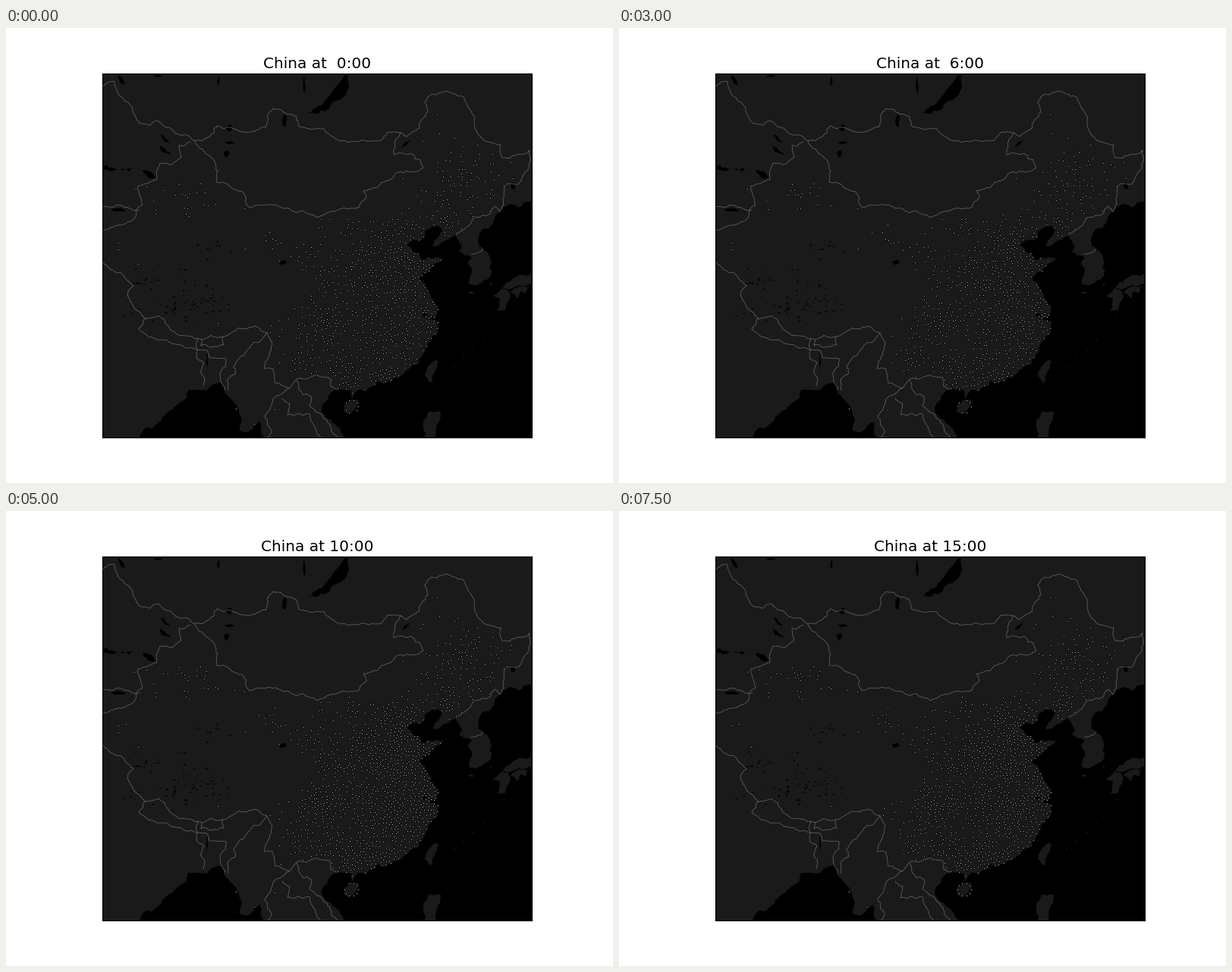
A matplotlib script that plays this animation: 800 by 600 pixels, repeating every 8 s.

```python
import numpy as np
import matplotlib.pyplot as plt
from matplotlib.animation import FuncAnimation
from matplotlib.path import Path

plt.rcParams["font.family"] = "DejaVu Sans"
rng = np.random.default_rng(8)
LAND, SEA = "#1a1a1a", "black"
LEFT, TOP, RIGHT, BOTTOM = 127, 60, 693, 540

fig = plt.figure(figsize=(8, 6), dpi=100, facecolor="white")
ax = fig.add_axes([LEFT / 800, 0.1, (RIGHT - LEFT) / 800, 0.8], facecolor=LAND)
ax.set(xlim=(LEFT, RIGHT), ylim=(BOTTOM, TOP), xticks=[], yticks=[])


def rough(*flat, amp=0.09, levels=4):
    """Turn x, y values into a naturally jagged line."""
    p = np.array(flat, float).reshape(-1, 2)
    for _ in range(levels):
        d = np.diff(p, axis=0)
        shift = rng.normal(0, amp, (len(d), 1)) * d[:, ::-1] * [1, -1]
        out = np.empty((2 * len(p) - 1, 2))
        out[::2] = p
        out[1::2] = p[:-1] + d / 2 + shift
        p = out
    return p


def area(points, color):
    ax.fill(*points.T, color=color, lw=0, zorder=1)


def island(*flat):
    area(rough(*flat, *flat[:2]), LAND)


def blob(x, y, w, h, color=SEA):
    a = np.linspace(0, 2 * np.pi, 13)
    r = rng.uniform(0.6, 1.25, 13)
    area(np.column_stack([x + w / 2 * r * np.cos(a), y + h / 2 * r * np.sin(a)]), color)


def border(*flat):
    points = rough(*flat)
    ax.plot(*points.T, color="0.45", lw=0.45, zorder=2)
    return points


# Coasts, from north to south
korea = rough(
    694, 229, 675, 237, 664, 232, 651, 242, 638, 263, 623, 274, 622, 281,
    637, 300, 640, 319, 637, 329, 611, 338, 614, 319, 609, 311, 614, 302,
    597, 295, 601, 287, 593, 273)
china = rough(
    593, 273, 574, 283, 563, 288, 575, 267, 570, 261, 561, 262, 547, 280,
    535, 279, 529, 286, 535, 294, 543, 297, 550, 307, 555, 302, 577, 304,
    562, 314, 547, 327, 545, 333, 552, 336, 559, 351, 570, 367, 568, 378,
    558, 383, 570, 387, 569, 402, 549, 432, 541, 444, 518, 461, 497, 469,
    489, 464, 488, 472, 463, 478, 457, 489, 455, 478, 438, 476)
tonkin = rough(438, 476, 426, 484, 416, 500, 425, 516, 441, 531, 447, 541)
area(np.vstack([korea, china, tonkin, [[694, 541]]]), SEA)
area(rough(175, 541, 196, 525, 206, 513, 238, 488, 240, 477, 285, 468,
           292, 485, 311, 516, 308, 531, 319, 533, 335, 519, 342, 541), SEA)

island(654, 342, 666, 332, 677, 325, 694, 322, 694, 336, 676, 339, 667, 343)
island(665, 349, 671, 343, 690, 340, 685, 350, 679, 347, 674, 356)
island(655, 343, 662, 346, 665, 354, 658, 372, 648, 373, 651, 357, 642, 354)
island(566, 437, 570, 440, 567, 450, 560, 471, 552, 459, 556, 447)
island(455, 490, 464, 490, 466, 495, 453, 509, 445, 505, 445, 498)
island(557, 505, 573, 506, 572, 517, 567, 527, 567, 541, 552, 541, 550, 529)
blob(613, 349, 8, 3, LAND)
blob(639, 338, 2, 5, LAND)
for t in np.linspace(0, 1, 6):  # thin island arc
    blob(656 - 66 * t, 381 + 65 * t ** 0.8, 2, 2, LAND)

# Lakes
area(rough(399, 112, 408, 113, 440, 95, 449, 84, 453, 60, 447, 60,
           430, 84, 420, 97, 399, 112), SEA)
area(rough(127, 183, 150, 186, 167, 185, 163, 189, 127, 187), SEA)
area(rough(180, 188, 190, 189, 197, 198, 188, 198, 180, 188), SEA)
area(rough(203, 155, 218, 167, 205, 164, 203, 155), SEA)
area(rough(204, 140, 216, 152, 208, 149, 204, 140), SEA)
area(rough(146, 60, 157, 75, 149, 68, 146, 60), SEA)
area(rough(522, 157, 525, 151, 533, 147, 522, 157), SEA)
blob(367, 122, 5, 16)
blob(294, 132, 9, 9)
blob(295, 151, 14, 4)
blob(291, 166, 7, 9)
blob(148, 240, 20, 5)
blob(668, 208, 6, 9)
blob(365, 309, 11, 7)
blob(552, 379, 7, 6)
blob(280, 70, 3, 15)
blob(393, 76, 3, 20)
blob(200, 63, 11, 4)
blob(265, 439, 2, 22)
for cx, cy, sx, sy, n in [(185, 332, 16, 7, 16), (225, 369, 28, 7, 34),
                          (262, 362, 18, 13, 26), (266, 306, 18, 16, 12)]:
    for x, y in rng.normal((cx, cy), (sx, sy), (n, 2)):
        blob(x, y, rng.uniform(1.5, 4.5), rng.uniform(1, 2.5))

# Borders
mongolia = border(
    249, 149, 273, 173, 279, 188, 277, 203, 305, 214, 325, 236, 365, 238,
    411, 250, 432, 242, 466, 236, 475, 224, 471, 215, 490, 210, 515, 191,
    550, 184, 536, 167, 511, 167, 520, 138)
amur = border(
    520, 138, 528, 143, 545, 132, 556, 111, 552, 97, 561, 87, 583, 84,
    603, 91, 617, 116, 622, 140, 652, 154, 654, 171, 664, 172, 690, 161,
    684, 190, 675, 206, 656, 209, 656, 233, 651, 242)
yalu = border(651, 242, 645, 235, 639, 243, 617, 250, 593, 273)
vietnam = border(438, 476, 428, 473, 427, 463, 410, 458, 383, 463, 373, 475)
burma = border(373, 475, 355, 468, 352, 450, 340, 449, 350, 413, 344, 402)
border(127, 78, 135, 71, 142, 70, 147, 85, 177, 126, 202, 123, 222, 137, 249, 149)
border(249, 149, 268, 143, 278, 129, 297, 131, 309, 137, 327, 137, 342, 131,
       345, 114, 352, 106, 381, 116, 385, 128, 419, 133, 445, 148, 495, 148,
       504, 137, 520, 138)
border(243, 150, 228, 155, 231, 169, 219, 180, 203, 178, 199, 200, 174, 208,
       180, 233, 155, 259, 127, 267)
border(127, 235, 152, 234, 176, 240)
border(127, 308, 137, 318, 155, 326, 168, 340, 160, 353, 168, 368, 184, 384,
       192, 382, 220, 400, 258, 411, 270, 405, 286, 407, 329, 393, 344, 402)
border(182, 383, 175, 397, 215, 414, 252, 424, 253, 409)
border(258, 411, 257, 419, 287, 418, 286, 407)
border(344, 402, 322, 420, 305, 438, 303, 455, 293, 462, 293, 478)
border(252, 424, 251, 435, 261, 442, 260, 472)
border(252, 424, 266, 426, 268, 435, 290, 436, 283, 453, 289, 477)
border(373, 475, 353, 488, 341, 512, 350, 531, 344, 541)
border(364, 488, 374, 495, 371, 510, 400, 509, 408, 527, 416, 541)
border(383, 464, 391, 483, 402, 486, 400, 498, 418, 514, 437, 541)
border(613, 298, 629, 291)

# Towns: centre x, y, spread x, y, tries
REMOTE = [(236, 216, 13, 5, 20), (238, 248, 4, 7, 6), (193, 225, 8, 18, 8),
          (350, 280, 14, 10, 18), (272, 235, 16, 2, 5), (146, 278, 6, 8, 3)]
CENTRES = [
    (520, 300, 22, 22, 420), (518, 277, 10, 9, 90), (552, 305, 14, 8, 90),
    (507, 335, 25, 14, 240), (553, 368, 13, 26, 420), (497, 385, 25, 30, 390),
    (536, 410, 18, 22, 250), (493, 457, 25, 8, 300), (460, 466, 15, 6, 80),
    (408, 383, 11, 9, 150), (430, 386, 15, 15, 85), (402, 425, 26, 22, 125),
    (387, 439, 4, 6, 28), (445, 445, 20, 16, 110), (458, 330, 25, 22, 150),
    (440, 338, 16, 2, 35), (472, 274, 28, 13, 85), (407, 313, 14, 13, 45),
    (583, 254, 9, 10, 75), (606, 200, 26, 27, 150), (548, 240, 22, 12, 20)]
LONE = [(549, 149), (595, 141), (568, 114), (301, 236), (174, 311), (279, 389),
        (327, 522), (354, 503), (303, 502), (665, 177)]


def scatter(groups):
    return np.vstack([rng.normal(g[:2], g[2:4], (g[4], 2)) for g in groups])


inland = Path(np.vstack([mongolia[len(mongolia) // 3:], amur, yalu, china,
                         vietnam, burma, [[345, 300]]]))
ring = np.linspace(0, 2 * np.pi, 11)[:-1]
hainan = np.column_stack([455 + 9 * np.cos(ring), 499 + 8 * np.sin(ring)])
tries = scatter(CENTRES)
rng.shuffle(tries)
tries = np.vstack([scatter(REMOTE), hainan, tries[inland.contains_points(tries)]])
towns = np.array(LONE, float)
for p in tries:
    if np.hypot(*(towns - p).T).min() > 3.5:
        towns = np.vstack([towns, p])

# Share of towns that are active in each hour
LEVEL = np.array([0.70, 0.56, 0.46, 0.41, 0.43, 0.50, 0.66, 0.78,
                  0.86, 0.90, 0.93, 0.93, 0.92, 0.93, 0.93, 0.91])
quiet = rng.uniform(0.3, 1.8, len(towns))
active = rng.random((len(LEVEL), len(towns))) < LEVEL[:, None] ** quiet

dots, = ax.plot([], [], "o", ms=1.6, mfc="0.72", mec="black", mew=0.6, zorder=3)
title = ax.set_title("", fontsize=14.4, pad=5)


def update(hour):
    dots.set_data(*towns[active[hour]].T)
    title.set_text(f"China at {hour:2d}:00")
    return dots, title


anim = FuncAnimation(fig, update, frames=len(LEVEL), interval=500, repeat=True,
                     repeat_delay=0, blit=False)
plt.show()
```
